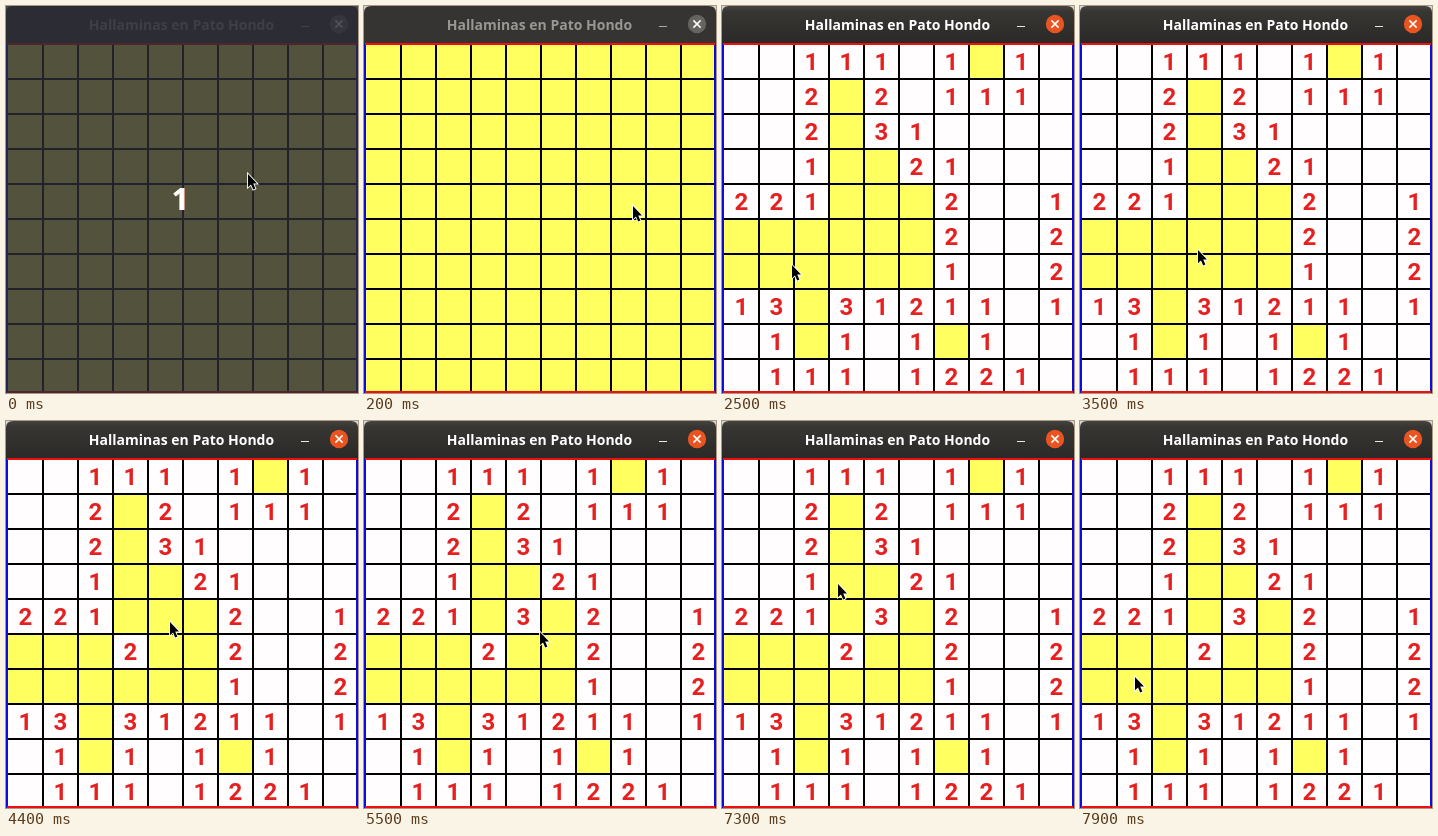
These frames come from a looping animation (352 by 387 pixels, 8000 ms). An HTML page:

```html
<!DOCTYPE html>
<html lang="es">
<head>
<meta charset="utf-8">
<title>Hallaminas en Pato Hondo</title>
<style>
  html, body { margin: 0; width: 100%; height: 100%; overflow: hidden; background: #d4d4d4; }
  svg { display: block; }
  .title { font: bold 14px "Noto Sans", "Open Sans", sans-serif; text-anchor: middle; }
  .digit { font: bold 24px Roboto, sans-serif; text-anchor: middle; fill: #e52020; }
  .count { font: bold 30px "Noto Sans", sans-serif; text-anchor: middle; fill: #fff; text-shadow: 1px 0 #e09a88; }
</style>
</head>
<body>
<svg width="352" height="387" viewBox="0 0 352 387">
  <defs>
    <linearGradient id="active" x1="0" y1="0" x2="0" y2="1">
      <stop offset="0" stop-color="#454440"/>
      <stop offset=".15" stop-color="#373633"/>
      <stop offset="1" stop-color="#2a2927"/>
    </linearGradient>
  </defs>
  <path id="bar" d="M0 38V7Q0 0 7 0H345Q352 0 352 7V38Z"/>
  <text id="title" class="title" x="175.5" y="24">Hallaminas en Pato Hondo</text>
  <path id="dash" d="M295 20.5H303" stroke-width="1"/>
  <circle id="close" cx="333" cy="18" r="9.2"/>
  <path d="M329.4 14.4L336.6 21.6M336.6 14.4L329.4 21.6" stroke="#fff" stroke-width="1.5"/>
  <rect y="38" width="352" height="349" fill="#fffdfd"/>
  <g id="cells"></g>
  <path id="lines" stroke="#000" stroke-width="2"/>
  <path d="M1 38V387M351 38V387" stroke="#0c0ce0" stroke-width="2"/>
  <path d="M1 38H351M1 386H351" stroke="#ee1010" stroke-width="2"/>
  <g id="shade">
    <rect width="352" height="387" fill="#2a2a36" fill-opacity=".81"/>
    <text class="count" x="174" y="204">1</text>
  </g>
  <path id="cursor" d="M0 0V13.2L3 10.4L5.2 15.6L7.4 14.6L5.2 9.6H9Z"
        fill="#000" stroke="#fff" stroke-width="1.8" paint-order="stroke"/>
</svg>
<script>
const LOOP = 8000, TICK = 100, OPENED = 700;
const SIZE = 35, LEFT = 2, TOP = 38;

// '*' mine, '#' covered but safe, '.' open; the last row and column lie off stage
const field = [
  '.......*...',
  '...*.......',
  '...*.......',
  '...#*......',
  '...##*.....',
  '**###*....*',
  '*#*#*#....*',
  '..#........',
  '..*...*....',
  '...........',
  '.......*...'
];
const clicks = { '5,3': 3700, '4,4': 4700 };

// Pointer strokes: when they run, where they end and how far they bow sideways
const home = { x: 242, y: 168 };
const strokes = [
  { from: 100, to: 200, x: 269, y: 200 },
  { from: 1600, to: 1900, x: 240, y: 299, bow: 0.85 },
  { from: 2100, to: 2300, x: 77, y: 264 },
  { from: 2500, to: 2500, x: 70, y: 259 },
  { from: 3000, to: 3300, x: 114, y: 248 },
  { from: 3500, to: 3600, x: 121, y: 240 },
  { from: 4100, to: 4200, x: 164, y: 201 },
  { from: 5400, to: 5700, x: 188, y: 221 },
  { from: 5900, to: 6200, x: 148, y: 142, bow: -0.2 },
  { from: 6400, to: 6400, x: 143, y: 133 },
  { from: 6600, to: 6800, x: 137, y: 131 },
  { from: 7100, to: 7900, x: 55, y: 256 }
];

const $ = id => document.getElementById(id);

function add(name, attrs, text = '') {
  const el = document.createElementNS('http://www.w3.org/2000/svg', name);
  for (const key in attrs) el.setAttribute(key, attrs[key]);
  el.textContent = text;
  return $('cells').appendChild(el);
}

function minesAround(row, col) {
  return field.slice(Math.max(0, row - 1), row + 2)
    .map(line => line.slice(Math.max(0, col - 1), col + 2))
    .join('').split('*').length - 1;
}

const cells = field.flatMap((line, row) => [...line].map((mark, col) => {
  const x = LEFT + col * SIZE, y = TOP + row * SIZE;
  const time = mark === '.' ? OPENED : clicks[[row, col]] ?? Infinity;
  const cover = add('rect', { x, y, width: SIZE, height: SIZE, fill: '#ffff60' });
  const label = add('text', { x: x + SIZE / 2, y: y + 26, class: 'digit' }, minesAround(row, col) || '');
  return { time, cover, label };
}));

let grid = '';
for (let i = 1; i < 10; i++) {
  grid += `M${LEFT + i * SIZE} 38V387M1 ${TOP + i * SIZE}H351`;
}
$('lines').setAttribute('d', grid);

const smooth = p => p * p * (3 - 2 * p);

function cursorAt(t) {
  let { x, y } = home;
  for (const s of strokes) {
    if (t < s.from) break;
    const p = smooth(Math.min(1, (t - s.from + TICK) / (s.to - s.from + TICK)));
    const dx = s.x - x, dy = s.y - y;
    const side = 2 * p * (1 - p) * (s.bow || 0);
    x += dx * p + dy * side;
    y += dy * p - dx * side;
  }
  return [Math.round(x), Math.round(y)];
}

function draw(t) {
  const focused = t >= OPENED;
  $('bar').setAttribute('fill', focused ? 'url(#active)' : '#353432');
  $('title').setAttribute('fill', focused ? '#fff' : '#999792');
  $('dash').setAttribute('stroke', focused ? '#e8e8e4' : '#aaa8a4');
  $('close').setAttribute('fill', focused ? '#e95420' : '#656461');
  $('shade').setAttribute('opacity', Math.max(0, 1 - t / 180));
  for (const { time, cover, label } of cells) {
    const open = t >= time;
    cover.setAttribute('visibility', open ? 'hidden' : 'visible');
    label.setAttribute('visibility', open ? 'visible' : 'hidden');
  }
  $('cursor').setAttribute('transform', `translate(${cursorAt(t)})`);
}

const begin = performance.now();
let shown = -1;
function tick() {
  const t = Math.floor((performance.now() - begin) % LOOP / TICK) * TICK;
  if (t !== shown) draw(shown = t);
  requestAnimationFrame(tick);
}
tick();
</script>
</body>
</html>
```
